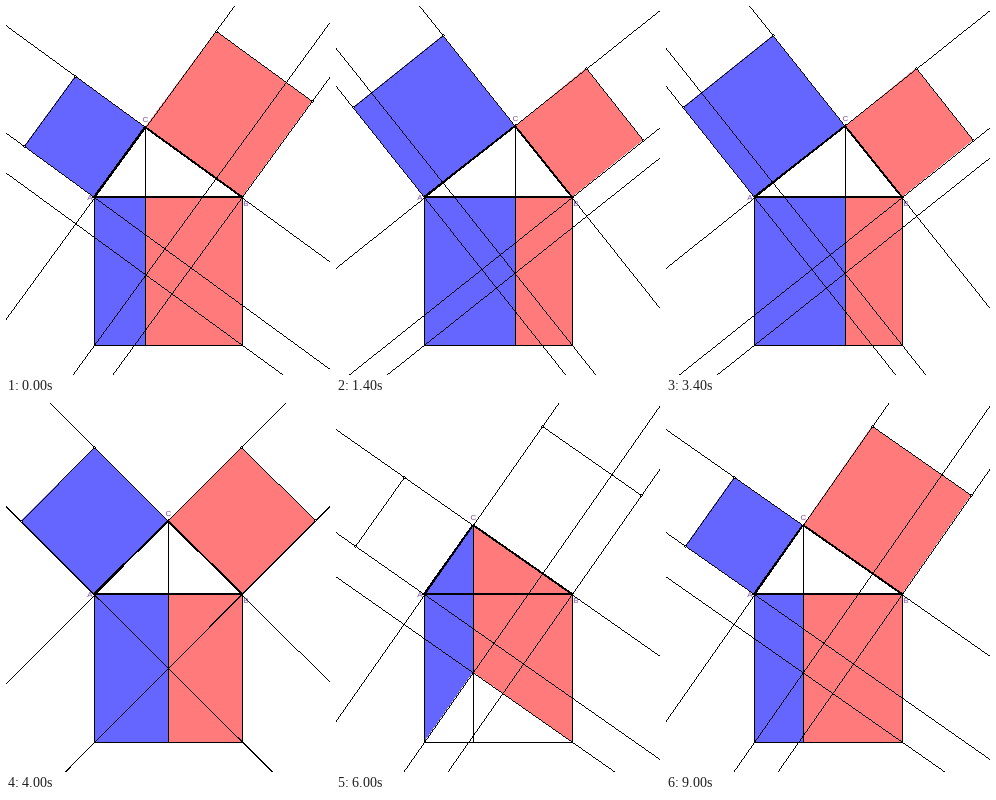
An HTML page with a canvas for the animation above (10 s loop, 324 px wide and 369 px high).

```html
<!DOCTYPE html>
<html lang="en">
<head>
<meta charset="utf-8">
<title>Square shearing proof</title>
<style>
html, body { margin: 0; width: 100%; height: 100%; overflow: hidden; background: #fff; }
canvas { display: block; width: 324px; height: 369px; }
</style>
</head>
<body>
<canvas id="stage" width="324" height="369"></canvas>
<script>
const ctx = document.getElementById('stage').getContext('2d');
const SIZE = [324, 369];
const LOOP = 10000, STEP = 100, MOVES = 49, SIDE = 147.3;
const BLUE = 'rgba(0,0,255,.605)', RED = 'rgba(255,0,0,.52)', INK = '#7a55a8';

const A = [88.8, 191.8], B = [A[0] + SIDE, A[1]];
const A2 = [A[0], A[1] + SIDE], B2 = [B[0], B[1] + SIDE];

const plus = (p, v, k = 1) => [p[0] + v[0] * k, p[1] + v[1] * k];
const minus = (p, q) => [p[0] - q[0], p[1] - q[1]];
const snap = p => p.map(Math.floor);
const center = p => snap(p).map(c => c + 0.5);

// Hard-edged line: one run of pixels per step along the longer axis.
function line(p, q, width = 1) {
  const i = Math.abs(q[1] - p[1]) > Math.abs(q[0] - p[0]) ? 1 : 0, j = 1 - i;
  if (p[i] > q[i]) [p, q] = [q, p];
  const slope = (q[j] - p[j]) / (q[i] - p[i]);
  const half = width / 2 * Math.hypot(1, slope);
  const last = Math.min(SIZE[i] - 1, Math.floor(q[i]));
  for (let n = Math.max(0, Math.floor(p[i])); n <= last; n++) {
    const c = p[j] + slope * (n + 0.5 - p[i]);
    const from = width === 1 ? Math.floor(c) : Math.ceil(c - half - 0.5);
    const run = width === 1 ? 1 : Math.ceil(c + half - 0.5) - from;
    if (i) ctx.fillRect(from, n, run, 1);
    else ctx.fillRect(n, from, 1, run);
  }
}
const segment = (p, q) => line(center(p), center(q));
const bold = (p, q) => line(snap(p), snap(q), 2);
const endless = (p, v) => line(plus(p, v, -20), plus(p, v, 20));

// Hard-edged fill of a convex shape, row by row.
function fill(shape, color) {
  const pts = shape.map(snap), ys = pts.map(p => p[1]);
  ctx.fillStyle = color;
  for (let y = Math.min(...ys); y < Math.max(...ys); y++) {
    const xs = [];
    pts.forEach((p, n) => {
      const q = pts[(n + 1) % pts.length], k = (y + 0.5 - p[1]) / (q[1] - p[1]);
      if (k >= 0 && k <= 1) xs.push(p[0] + (q[0] - p[0]) * k);
    });
    const left = Math.ceil(Math.min(...xs) - 0.5);
    ctx.fillRect(left, y, Math.ceil(Math.max(...xs) - 0.5) - left, 1);
  }
}

function dot(p) {
  const [x, y] = snap(p);
  ctx.fillStyle = '#000';
  ctx.fillRect(x - 1, y, 3, 1);
  ctx.fillRect(x, y - 1, 1, 3);
  ctx.fillStyle = '#fff';
  ctx.fillRect(x, y, 1, 1);
}

// Apex of the right triangle, swinging on the half circle over AB.
function apex(t) {
  const k = Math.min(Math.floor(t / STEP), MOVES);
  const pos = k <= 24 ? k : 48 - k;
  const a = (107.8 - 2.2 * pos) * Math.PI / 180, r = SIDE / 2;
  return [A[0] + r + r * Math.cos(a), A[1] - r * Math.sin(a)];
}

function draw(t) {
  const C = apex(t), C2 = plus(C, [0, SIDE]);
  const foot = [C[0], A[1]], foot2 = [C[0], A2[1]];
  const ac = minus(C, A), cb = minus(B, C);
  const outL = [ac[1], -ac[0]], outR = [cb[1], -cb[0]];
  const square = (p, q, v, k) => [p, q, plus(q, v, k), plus(p, v, k)];

  const outer = [square(A, C, outL, 1), square(C, B, outR, 1)];
  const inner = [square(A, C, outL, -1), square(C, B, outR, -1)];
  const rects = [[A, foot, foot2, A2], [foot, B, B2, foot2]];
  const sheared = [[A, C, C2, A2], [C, B, B2, C2]];
  const all = [...outer, ...rects];
  const stages = [rects, sheared, inner, outer, all];
  const shown = t < 5000 ? all : stages[Math.floor(t / 1000) - 5];

  ctx.fillStyle = '#fff';
  ctx.fillRect(0, 0, ...SIZE);
  shown.forEach((shape, n) => fill(shape, n % 2 ? RED : BLUE));

  ctx.fillStyle = '#000';
  [A, B, A2].forEach(p => endless(p, ac));
  [A, B, B2].forEach(p => endless(p, cb));
  segment(A, A2);
  segment(A2, B2);
  segment(B, B2);
  segment(C, foot2);
  outer.forEach(s => segment(s[2], s[3]));
  bold(A, B);
  bold(A, C);
  bold(C, B);
  outer.forEach(s => { dot(s[2]); dot(s[3]); });

  ctx.font = '8px "Liberation Sans", Arial, sans-serif';
  ctx.textAlign = 'center';
  ctx.fillStyle = INK;
  ctx.fillText('A', 84, 194);
  ctx.fillText('B', 240, 200);
  ctx.fillText('C', Math.floor(C[0]) + 0.5, Math.floor(C[1]) - 5);
}

const start = performance.now();
function tick() {
  draw((performance.now() - start) % LOOP);
  requestAnimationFrame(tick);
}
tick();
</script>
</body>
</html>
```
